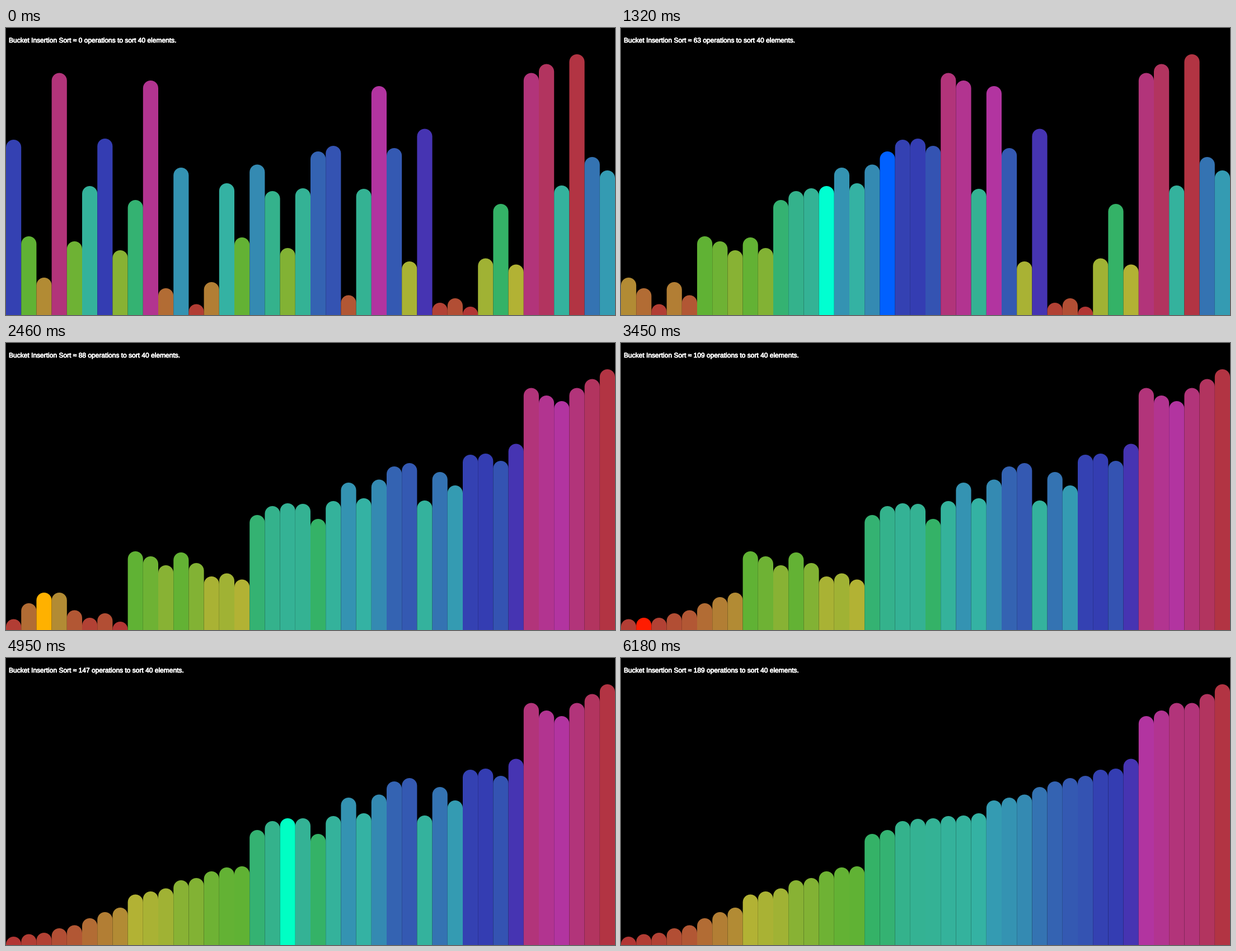
Recreate the animation shown at these times as a matplotlib script. Size 1088 by 514 pixels, loop 9000 ms.

```python
import colorsys

import matplotlib.pyplot as plt
import numpy as np
from matplotlib import patheffects
from matplotlib.animation import FuncAnimation
from matplotlib.collections import LineCollection

W, H, DPI = 1088, 514, 100
PT = 72 / DPI
TICK_MS, TICKS = 30, 300

# Apex of each bar, measured down from the top of the stage.
TOPS = [200, 373, 447, 80.5, 382, 283, 198, 398, 308, 94,
        466, 250, 494.5, 455, 278, 375, 244.5, 292, 394, 287,
        221, 211, 478.5, 288, 104, 215, 418, 180.5, 492, 484,
        499, 412.5, 315, 423.5, 80.5, 64.5, 282, 47, 231, 255]
N = len(TOPS)
BAR = W / N
RADIUS = BAR / 2
SCALE = 0.9 * H
BUCKETS, BUCKET_SIZE = 6, 75.72

# Pace of the sort: (tick, step) pairs, linear in between.
PACE = np.array([(0, 0), (1, 1), (30, 17), (32, 18), (44, 25), (45, 26),
                 (62, 35), (64, 36), (94, 51), (96, 52), (115, 62), (117, 63),
                 (125, 67), (127, 68), (143, 76), (145, 77), (156, 83),
                 (158, 84), (182, 98), (183, 99), (187, 101), (189, 102),
                 (206, 111)])


def bucket_of(height):
    return min(BUCKETS - 1, int(height / BUCKET_SIZE))


def sort_steps(values):
    """Return every visible state as (values, highlighted indices, operations)."""
    a = list(values)
    steps = [(a[:], (), 0), (a[:], (N - 1,), N)]
    ops = N

    # Gather the elements into contiguous buckets.
    for i in range(N):
        key = bucket_of(a[i])
        pos = sum(bucket_of(v) <= key for v in a[:i])
        steps.append((a[:], (pos, max(0, (pos + i - 1) // 2)), ops))
        a.insert(pos, a.pop(i))
        ops += 1

    # Insertion sort inside each bucket.
    for b in range(BUCKETS):
        members = [i for i in range(N) if bucket_of(a[i]) == b]
        first = members[0]
        for i in members:
            ops += 1
            held, j = a[i], i
            while j > first and a[j - 1] > held:
                a[j] = a[j - 1]
                j -= 1
                ops += 1
                steps.append((a[:], (j,), ops))
            a[j] = held

    steps.append((a[:], (), ops))
    return steps


def bar_color(height, highlighted):
    hue = (height - RADIUS) / SCALE
    light, sat = (0.5, 1.0) if highlighted else (0.45, 0.55)
    return colorsys.hls_to_rgb(hue, light, sat)


STEPS = sort_steps([H - top for top in TOPS])

fig = plt.figure(figsize=(W / DPI, H / DPI), dpi=DPI, facecolor="black")
ax = fig.add_axes([0, 0, 1, 1])
ax.set(xlim=(0, W), ylim=(0, H))
ax.axis("off")

bars = LineCollection([], linewidths=BAR * PT, capstyle="round")
bars.set_snap(False)
ax.add_collection(bars, autolim=False)

label = ax.text(5, H - 26, "", color="white", family="Liberation Sans",
                size=12 * PT, va="baseline")
label.set_path_effects([
    patheffects.Stroke(linewidth=0.8 * PT, foreground="white"),
    patheffects.Normal(),
])


def draw(tick):
    step = int(np.interp(tick, PACE[:, 0], PACE[:, 1]) + 1e-6)
    values, marked, ops = STEPS[min(step, len(STEPS) - 1)]
    centers = [(i + 0.5) * BAR for i in range(N)]
    bars.set_segments([[(x, 0), (x, v - RADIUS)]
                       for x, v in zip(centers, values)])
    bars.set_color([bar_color(v, i in marked) for i, v in enumerate(values)])
    label.set_text(f"Bucket Insertion Sort ≈ {ops} operations "
                   f"to sort {N} elements.")
    return bars, label


anim = FuncAnimation(fig, draw, frames=TICKS, interval=TICK_MS,
                     init_func=lambda: draw(0), repeat=True, repeat_delay=0)
plt.show()
```
